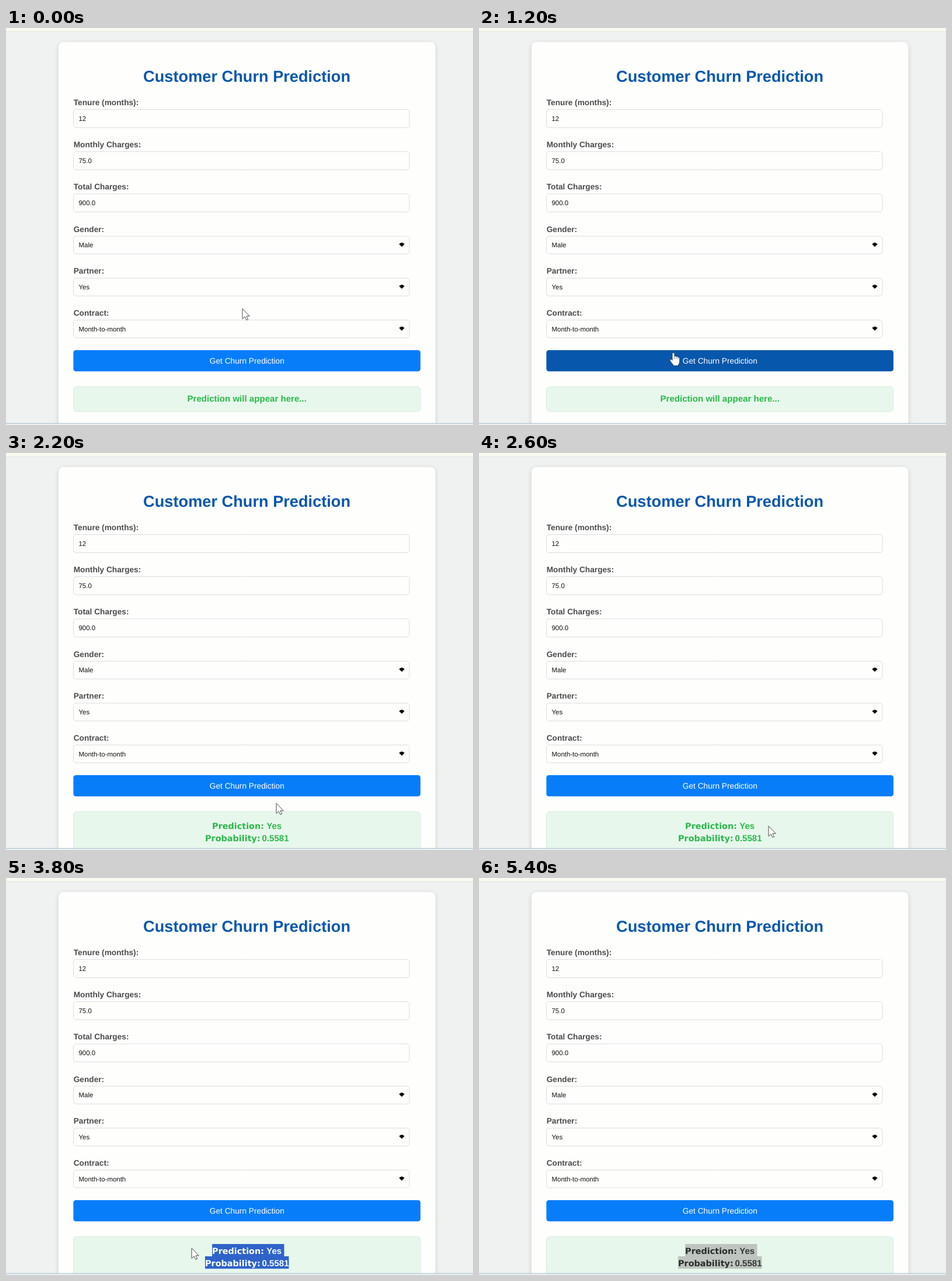
Write an HTML page with a canvas that moves like this. It is 800 by 679 pixels and loops after 5500 ms.

```html
<!DOCTYPE html>
<html lang="en">
<head>
<meta charset="utf-8">
<title>Customer Churn Prediction</title>
<style>
html, body { margin: 0; width: 100%; height: 100%; overflow: hidden; background: #f0f2f2; }
canvas { display: block; }
</style>
</head>
<body>
<canvas id="stage" width="800" height="679"></canvas>
<script>
const ctx = document.getElementById('stage').getContext('2d');
ctx.textRendering = 'geometricPrecision';

const LOOP = 5500, STEP = 100;
const SANS = '"Liberation Sans", Arial, sans-serif';
const HEAVY = 'bold 14.4px "DejaVu Sans", sans-serif';
const BOLD = `bold 15.09px ${SANS}`;
const GREEN = '#2db84b';

// Cursor tip over time: [ms, x, y]
const PATH = [
  [0, 405, 480], [700, 405, 480], [1200, 333, 555], [1400, 345, 557],
  [1700, 419, 552], [1900, 430, 560], [2500, 496, 638], [2700, 496, 638],
  [3000, 486, 660], [3500, 336, 638], [3700, 318, 633], [4100, 318, 633],
  [4600, 330, 690], [5500, 330, 690]
];
const HOVER_ON = 1100, RESULT_AT = 1500, DRAG_AT = 3000, DRAG_END = 3500, BLUR_AT = 4900;
const BUTTON = { x: 115.4, y: 551, w: 594.6, h: 36.2 };

const FIELDS = [
  ['Tenure (months):', '12', 139.5],
  ['Monthly Charges:', '75.0', 211.5],
  ['Total Charges:', '900.0', 283.7],
  ['Gender:', 'Male', 356, true],
  ['Partner:', 'Yes', 427.8, true],
  ['Contract:', 'Month-to-month', 499.4, true]
];

const RESULT = [
  { key: 'Prediction:', value: 'Yes', x: 353.1, valueX: 446.2, base: 642.5, top: 626, right: 476.5 },
  { key: 'Probability:', value: '0.5581', x: 341, valueX: 438.5, base: 663.7, top: 647, right: 484.5 }
];

function text(str, x, y, font, color, align = 'left') {
  ctx.font = font;
  ctx.fillStyle = color;
  ctx.textAlign = align;
  ctx.fillText(str, x, y);
}

function box(x, y, w, h, r, fill, stroke) {
  ctx.beginPath();
  ctx.roundRect(x, y, w, h, r);
  ctx.fillStyle = fill;
  ctx.fill();
  if (stroke) {
    ctx.strokeStyle = stroke;
    ctx.lineWidth = 1;
    ctx.stroke();
  }
}

function cursorAt(t) {
  const i = PATH.findIndex((p, n) => n + 1 < PATH.length && t < PATH[n + 1][0]);
  const [t0, x0, y0] = PATH[i], [t1, x1, y1] = PATH[i + 1];
  const u = (t - t0) / (t1 - t0), k = u * u * (3 - 2 * u);
  return { x: x0 + (x1 - x0) * k, y: y0 + (y1 - y0) * k };
}

function outline(path, x, y, color, width) {
  ctx.save();
  ctx.translate(x, y);
  ctx.fillStyle = '#fff';
  ctx.strokeStyle = color;
  ctx.lineWidth = width;
  ctx.lineJoin = 'round';
  ctx.fill(path);
  ctx.stroke(path);
  ctx.restore();
}

const ARROW = new Path2D('M0 0V17.5L4.2 13.8L7 19.6L9.6 18.4L7 12.8H12.3Z');
const HAND = new Path2D('M-2 1.5Q0-1.5 2 1.5V6.5Q4 5 5 7Q7.3 5.8 8 8Q10.6 7.3 10.8 10V16' +
  'Q10.6 19 8.5 21V22.8H-.5V21Q-3.5 18-6 13.5Q-6.4 10.8-3.7 11.6L-2 13.3Z');
const CREASES = new Path2D('M2 6.5V11M5 7.5V11M8 8.5V11.5');

function drawCursor(x, y, hand) {
  if (!hand) return outline(ARROW, x, y, '#4a4a4a', 1);
  outline(HAND, x, y, '#20364f', 1);
  ctx.save();
  ctx.translate(x, y);
  ctx.strokeStyle = '#50606f';
  ctx.lineWidth = 0.8;
  ctx.stroke(CREASES);
  ctx.restore();
}

function drawPage() {
  ctx.fillStyle = '#f0f2f2';
  ctx.fillRect(0, 0, 800, 679);
  ctx.save();
  ctx.shadowColor = 'rgba(0,0,0,.14)';
  ctx.shadowBlur = 9;
  ctx.shadowOffsetY = 2;
  box(90, 24, 645.5, 700, 8.5, '#fefffd');
  ctx.restore();
  ctx.fillStyle = '#f8fbf0';
  ctx.fillRect(0, 0, 800, 5.5);
  ctx.fillStyle = '#e3e7dc';
  ctx.fillRect(0, 5.5, 800, 1);

  text('Customer Churn Prediction', 412.6, 92, `bold 27.2px ${SANS}`, '#0857ad', 'center');
  for (const [label, value, y, select] of FIELDS) {
    text(label, 115.7, y - 7.4, `bold 13.7px ${SANS}`, '#4a4b4c');
    box(115.5, y, 575.5, select ? 30.5 : 31, 4.3, '#fefffd', '#dcdddc');
    text(value, 124.5, y + 19.2, `11.45px ${SANS}`, '#111');
    if (select) drawChevron(678, y + 14.5);
  }
}

function drawChevron(x, y) {
  ctx.beginPath();
  ctx.moveTo(x - 4.6, y - 0.8);
  ctx.quadraticCurveTo(x, y - 6, x + 4.6, y - 0.8);
  ctx.lineTo(x, y + 3.8);
  ctx.closePath();
  ctx.fillStyle = '#000';
  ctx.fill();
}

function drawButton(hover) {
  box(BUTTON.x, BUTTON.y, BUTTON.w, BUTTON.h, 4.3, hover ? '#0757ac' : '#087df9');
  text('Get Churn Prediction', 412.8, 573.7, `13.72px ${SANS}`, '#fff', 'center');
}

function drawResultText(keyColor, valueColor) {
  for (const line of RESULT) {
    text(line.key, line.x, line.base, HEAVY, keyColor);
    text(line.value, line.valueX, line.base, BOLD, valueColor);
  }
}

// The selection grows backwards from the end of the last line.
function selectionStarts(t, cursor) {
  if (t >= DRAG_END) return RESULT.map(line => line.x);
  const onFirst = cursor.y < RESULT[1].top;
  return RESULT.map((line, i) => {
    if (i === 0 && !onFirst) return line.right;
    if (i === 1 && onFirst) return line.x;
    return Math.min(line.right, Math.max(line.x, cursor.x));
  });
}

function drawSelection(t, cursor) {
  const blurred = t >= BLUR_AT;
  const starts = selectionStarts(t, cursor);
  ctx.save();
  ctx.beginPath();
  RESULT.forEach((line, i) => ctx.rect(starts[i], line.top, line.right - starts[i], 21.3));
  ctx.fillStyle = blurred ? '#bec4bf' : '#2f63c9';
  ctx.fill();
  ctx.clip();
  drawResultText(blurred ? '#292d2b' : '#fff', blurred ? '#353937' : '#f4f8ff');
  ctx.restore();
}

function drawResult(t, cursor) {
  const ready = t >= RESULT_AT;
  box(115.5, 613.3, 594.3, ready ? 90 : 42.7, 6, '#e7f7ec', '#d9eadf');
  if (!ready) {
    text('Prediction will appear here...', 412.7, 639.4, BOLD, GREEN, 'center');
    return;
  }
  drawResultText(GREEN, GREEN);
  if (t >= DRAG_AT) drawSelection(t, cursor);
}

function drawBottomEdge() {
  ctx.fillStyle = '#b3c8d8';
  ctx.fillRect(0, 675.7, 800, 1.6);
  ctx.fillStyle = '#eef3f4';
  ctx.fillRect(0, 677.3, 800, 1.7);
}

function draw(t) {
  const cursor = cursorAt(t);
  const hover = t >= HOVER_ON && cursor.y >= BUTTON.y && cursor.y <= BUTTON.y + BUTTON.h;
  drawPage();
  drawButton(hover);
  drawResult(t, cursor);
  drawBottomEdge();
  drawCursor(cursor.x, cursor.y, hover);
}

function frame() {
  draw(Math.floor(performance.now() % LOOP / STEP) * STEP);
  requestAnimationFrame(frame);
}
frame();
</script>
</body>
</html>
```
